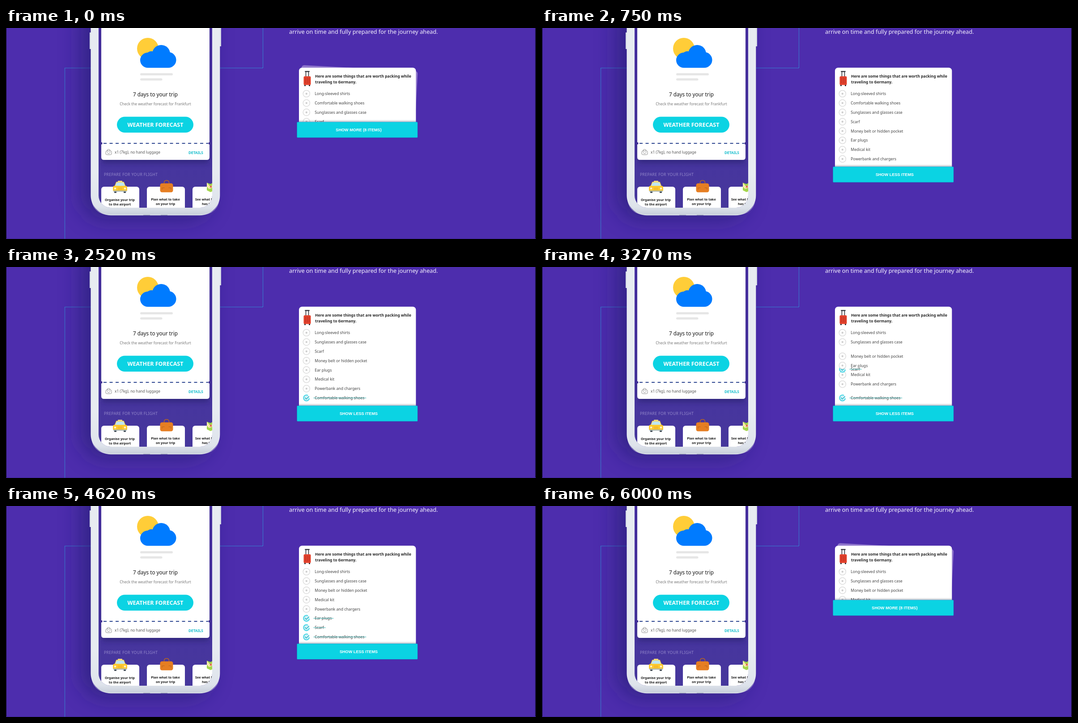
These frames come from a looping animation (1185x472 px, 6.06 s). An HTML page:

```html
<!DOCTYPE html>
<html lang="en">
<head>
<meta charset="utf-8">
<title>Packing list</title>
<style>
  html, body { margin: 0; width: 100%; height: 100%; overflow: hidden; background: #4d2dad; }
  svg { display: block; width: 1185px; height: 472px; font-family: "Noto Sans", "Open Sans", sans-serif; }
  .mid { text-anchor: middle; }
  .semi { font-weight: 600; }
  .bold { font-weight: 700; }
  .tile { font-size: 7.3px; font-weight: 600; fill: #161616; }
  .label { font: 700 9.15px "Liberation Sans", Arial, sans-serif; fill: #fff; text-anchor: middle; }
  .item { font-size: 8.7px; }
  .line { fill: none; stroke-linecap: round; stroke-linejoin: round; }
</style>
</head>
<body>
<svg viewBox="0 0 1185 472">
  <defs>
    <filter id="blur" x="-50%" y="-50%" width="200%" height="200%"><feGaussianBlur stdDeviation="24"/></filter>
    <filter id="soft" x="-30%" y="-30%" width="160%" height="160%"><feGaussianBlur stdDeviation="6"/></filter>
    <linearGradient id="frame" x2="0" y2="1">
      <stop offset=".8" stop-color="#e7ebf1"/><stop offset=".96" stop-color="#dee3eb"/><stop offset="1" stop-color="#c6cdd9"/>
    </linearGradient>
    <linearGradient id="screenFill" x2="0" y2="1">
      <stop offset="0" stop-color="#4a2fa6"/><stop offset="1" stop-color="#46379c"/>
    </linearGradient>
    <linearGradient id="lip" x2="0" y2="1">
      <stop offset="0" stop-color="#123" stop-opacity="0"/><stop offset="1" stop-color="#123" stop-opacity=".25"/>
    </linearGradient>
    <clipPath id="screen"><rect x="207" y="-60" width="254" height="462" rx="27"/></clipPath>
    <clipPath id="listClip"><rect id="window" x="655" y="89" width="262" height="122"/></clipPath>
  </defs>

  <rect width="1185" height="472" fill="#4d2dad"/>
  <path d="M574.5 0V89.5H131.5V472" fill="none" stroke="#2f9fdc" stroke-width="1.6" stroke-dasharray="1.5 1.5"/>

  <!-- phone -->
  <rect x="168" y="-60" width="290" height="488" rx="50" fill="#1d1a66" opacity=".55" filter="url(#blur)"/>
  <path d="M187 10h4v37h-4zM477 -5h4v46h-4z" fill="#d5dae5"/>
  <rect x="189.500" y="-60" width="288.800" height="479.300" rx="45" fill="url(#frame)"/>
  <path d="M190.500 0V374Q191 418 235 418H433Q477 418 477.500 374V0" fill="none" stroke="#f2f5f8" stroke-opacity=".6"/>
  <path d="M307 418.500h15M346 418.500h15" stroke="#8d95aa"/>
  <g clip-path="url(#screen)">
    <rect x="207" y="-60" width="254" height="462" fill="url(#screenFill)"/>
    <rect x="215" y="-20" width="238" height="322" fill="#211b66" opacity=".55" filter="url(#soft)"/>
    <path d="M213 -10H455V255.500a2.500 2.500 0 0 0 0 5V289q0 6 -6 6H219q-6 0 -6 -6V260.500a2.500 2.500 0 0 0 0 -5z" fill="#fff"/>
    <path d="M218 258H452" stroke="#2c4590" stroke-width="2" stroke-dasharray="7 6.5"/>

    <circle cx="317" cy="46" r="24" fill="#ffcd38"/>
    <g fill="#007bff">
      <circle cx="347" cy="58" r="20"/><circle cx="325" cy="65" r="13"/>
      <circle cx="317" cy="72" r="17"/><circle cx="363" cy="71.500" r="17.500"/>
      <rect x="317" y="62" width="46" height="27"/>
    </g>
    <path d="M302.500 103.500H370.500M302.500 115H347" class="line" stroke="#e6e6e6" stroke-width="5"/>
    <text class="mid" x="334" y="152.500" font-size="11.700" font-weight="500" fill="#111">7 days to your trip</text>
    <text class="mid" x="334" y="173" font-size="8.400" fill="#7a7a7a">Check the weather forecast for Frankfurt</text>
    <rect x="248" y="198.500" width="171" height="35.500" rx="17.750" fill="#0bd3e3"/>
    <text class="mid semi" x="334" y="220.800" font-size="12.500" fill="#fff">WEATHER FORECAST</text>

    <g class="line" stroke="#8d8d8d" stroke-width="1">
      <rect x="223" y="275" width="13" height="8.500" rx="2.500"/>
      <path d="M226.500 275v-2q0 -1.500 3 -1.500t3 1.500v2M226.500 278v1.500M232.500 278v1.500M228 280.500h3"/>
    </g>
    <text x="243" y="281" font-size="8.350" fill="#555">x1 (7kg), no hand luggage</text>
    <text class="bold" x="408" y="281.500" font-size="8.200" fill="#12bccb">DETAILS</text>
    <text x="219" y="331.200" font-size="8.600" letter-spacing=".4" font-weight="300" fill="#9589cb">PREPARE FOR YOUR FLIGHT</text>

    <g fill="#fff">
      <rect x="213" y="355" width="85" height="70" rx="6"/>
      <rect x="315" y="355" width="85" height="70" rx="6"/>
      <rect x="417" y="355" width="85" height="70" rx="6"/>
    </g>
    <g class="tile">
      <g class="mid">
        <text x="254.500" y="386.600">Organise your trip</text><text x="254.500" y="396.600">to the airport</text>
        <text x="356.500" y="386.200">Plan what to take</text><text x="356.500" y="396.200">on your trip</text>
      </g>
      <text x="423" y="386.400">See what Frankfurt</text><text x="438" y="396.400">has to offer</text>
    </g>

    <!-- taxi, briefcase, map -->
    <g>
      <path d="M242 364h5v5h-5zM263 364h5v5h-5z" fill="#4a5560"/>
      <rect x="250" y="341.800" width="10" height="4" rx="1" fill="#ffe08a"/>
      <path d="M246.500 344h17l4 10h-25z" fill="#ffd34d"/>
      <path d="M247.500 345.500h15l3.500 8h-22z" fill="#bfe6f2"/>
      <rect x="239" y="353" width="32" height="13" rx="4" fill="#ffc930"/>
      <path d="M250 358h10M250 361h10" stroke="#e0a526"/>
      <circle cx="244" cy="359" r="2.300" fill="#fff3c4"/><circle cx="266" cy="359" r="2.300" fill="#fff3c4"/>
      <path d="M240 364.800h30" stroke="#9fb3bf" stroke-width="2"/>
    </g>
    <path d="M353.500 349v-3q0 -5 5.500 -5t5.500 5v3" class="line" stroke="#b9651d" stroke-width="1.500"/>
    <rect x="344.500" y="347.500" width="29" height="20" rx="4.500" fill="#e67e22"/>
    <path d="M349 361v-3.500h5M369 361v-3.500h-5" class="line" stroke="#bb641b"/>
    <path d="M449 346l8 3 8 -4v19l-8 3 -8 -4z" fill="#a4d64b"/>
    <path d="M449 346l7 8 7 -3v6l-9 3 -5 -5z" fill="#f7ebaa"/>
    <path d="M456 353l4 4m0 -4l-4 4" stroke="#d94b3a" stroke-width="1.500"/>
  </g>

  <text x="633" y="13.300" font-size="12.720" fill="#f6f3ff">arrive on time and fully prepared for the journey ahead.</text>

  <!-- packing card -->
  <rect id="backCard" x="661" y="83" width="260" height="112" rx="6" fill="#8f76cc"/>
  <rect id="card" x="655" y="88.700" width="261.500" height="130" rx="7" fill="#fff"/>
  <g>
    <path d="M670.500 109V97.500h6V109" class="line" stroke="#2d2f36" stroke-width="1.600"/>
    <path d="M669 97.200h9" class="line" stroke="#2d2f36" stroke-width="2"/>
    <path d="M667 126h3v4h-3zM677 126h3v4h-3z" fill="#30323a"/>
    <rect x="665.500" y="108" width="16" height="19.500" rx="2.500" fill="#e5432d"/>
    <path d="M669.500 111v13M673.500 111v13M677.500 111v13" stroke="#b52f22" stroke-width="1.200"/>
  </g>
  <g class="bold" font-size="8.460" fill="#262626">
    <text x="691" y="110.600">Here are some things that are worth packing while</text>
    <text x="691" y="124.400">traveling to Germany.</text>
  </g>
  <g clip-path="url(#listClip)"><g id="list"></g></g>
  <g id="toggle">
    <rect x="655" y="-5" width="261.500" height="5" fill="url(#lip)"/>
    <rect x="650.500" y=".2" width="269.800" height="35" rx="1.500" fill="#0bd3e3" stroke="#1a5fb4" stroke-opacity=".4"/>
    <text id="more" class="label" x="788.500" y="20.700">SHOW MORE (8 ITEMS)</text>
    <text id="less" class="label" x="788.500" y="21.200">SHOW LESS ITEMS</text>
  </g>

  <path d="M0 0h1v472h-1zM1183.500 0h1.500v472h-1.500z" fill="#0c0720"/>
  <path d="M0 471.500H1185" stroke="#3b2390"/>
</svg>

<script>
const LOOP = 6060, TOP = 147, PITCH = 20.85;
const ITEMS = ['Long-sleeved shirts', 'Comfortable walking shoes', 'Sunglasses and glasses case', 'Scarf',
  'Money belt or hidden pocket', 'Ear plugs', 'Medical kit', 'Powerbank and chargers'];
// Item index, time of the tap, slot it ends in at the bottom of the list.
const TAPS = [[1, 1470, 7], [3, 2585, 6], [5, 3700, 5]];
const CHECK = 300, STRIKE = 220, MOVE_AT = 500, MOVE = 380;

const $ = id => document.getElementById(id);
const clamp = x => Math.min(1, Math.max(0, x));
const ramp = (t, start, length) => clamp((t - start) / length);
const mix = (a, b, p) => a + (b - a) * p;
const easeOut = p => 1 - (1 - p) ** 3;
const easeInOut = p => p < .5 ? 2 * p * p : 1 - 2 * (1 - p) ** 2;

const rows = ITEMS.map(name => {
  const g = document.createElementNS('http://www.w3.org/2000/svg', 'g');
  g.innerHTML = `
    <g class="radio"><circle r="7.6" fill="#fff" stroke="#dcdcdc" stroke-width="1.5"/><circle r="2.2" fill="#cfcfcf"/></g>
    <circle class="disc" r="7" fill="#d3f1f6"/>
    <path class="arc" d="M3.2 -5.7A6.5 6.5 0 1 0 6.4 1.1" fill="none" stroke="#52d8e7" stroke-width="2.3" pathLength="1" stroke-dasharray="1 2"/>
    <path class="tick line" d="M-3 -.3L-.4 2.4L5.4 -3.2" stroke="#2bbccc" stroke-width="1.7" pathLength="1" stroke-dasharray="1 2"/>
    <text class="item" x="18.5" y="3.1" fill="#444">${name}</text>
    <path class="strike" stroke="#3db8b8" stroke-width="1"/>`;
  $('list').append(g);
  const part = cls => g.querySelector('.' + cls);
  return { g, radio: part('radio'), disc: part('disc'), arc: part('arc'), tick: part('tick'), text: part('item'), strike: part('strike') };
});
TAPS.forEach(([i]) => $('list').append(rows[i].g));

function slotOf(index, t) {
  let slot = index;
  for (const [tapped, start, end] of TAPS) {
    const p = easeInOut(ramp(t, start + MOVE_AT, MOVE));
    if (tapped === index) return mix(slot, end, p);
    if (index > tapped) slot -= p;
  }
  return slot;
}

function drawStroke(path, p) {
  path.style.opacity = p > 0 ? 1 : 0;
  path.style.strokeDashoffset = 1 - p;
}

function drawRow(row, index, t) {
  row.g.setAttribute('transform', `translate(671.8 ${TOP + PITCH * slotOf(index, t)})`);
  row.g.style.opacity = index > 5 ? ramp(t, 340 + (index - 6) * 90, 150) : 1;
  const tap = TAPS.find(([i]) => i === index);
  const since = tap ? t - tap[1] : -1;
  const hit = ramp(since, 0, 70);
  row.radio.style.opacity = 1 - hit;
  row.disc.style.opacity = hit;
  drawStroke(row.arc, ramp(since, 0, CHECK));
  drawStroke(row.tick, ramp(since, 110, CHECK - 110));
  const p = easeInOut(ramp(since, CHECK, STRIKE));
  row.strike.setAttribute('d', `M15.5 0H${15.5 + (row.text.getComputedTextLength() + 7) * p}`);
  row.strike.style.opacity = p > 0 ? 1 : 0;
}

function draw(t) {
  const close = easeInOut(ramp(t, 4560, 590));
  const opened = mix(210, 312, easeOut(ramp(t, 20, 300))) - 2 * easeInOut(ramp(t, 350, 200));
  const y = mix(opened, 210, close);
  const tuck = mix(8, 0, ramp(t, 40, 250)) + 8 * ramp(t, 350, 200);
  const tilt = t < 4000 ? 1 - easeOut(ramp(t, 20, 260)) : easeOut(ramp(t, 4900, 450));

  $('toggle').setAttribute('transform', `translate(0 ${y})`);
  $('card').setAttribute('height', y + tuck - 88.7);
  $('window').setAttribute('height', y - 89);
  $('backCard').setAttribute('transform', `translate(${-5 * (1 - tilt)} ${6 * (1 - tilt)}) rotate(${3 * tilt} 661 83)`);
  $('backCard').style.opacity = clamp(tilt * 2);

  const less = ramp(t, 380, 160) * (1 - ramp(t, 4850, 160));
  $('less').style.opacity = less;
  $('more').style.opacity = 1 - less;
  rows.forEach((row, i) => drawRow(row, i, t));
}

function frame() {
  draw(performance.now() % LOOP);
  requestAnimationFrame(frame);
}
frame();
</script>
</body>
</html>
```
